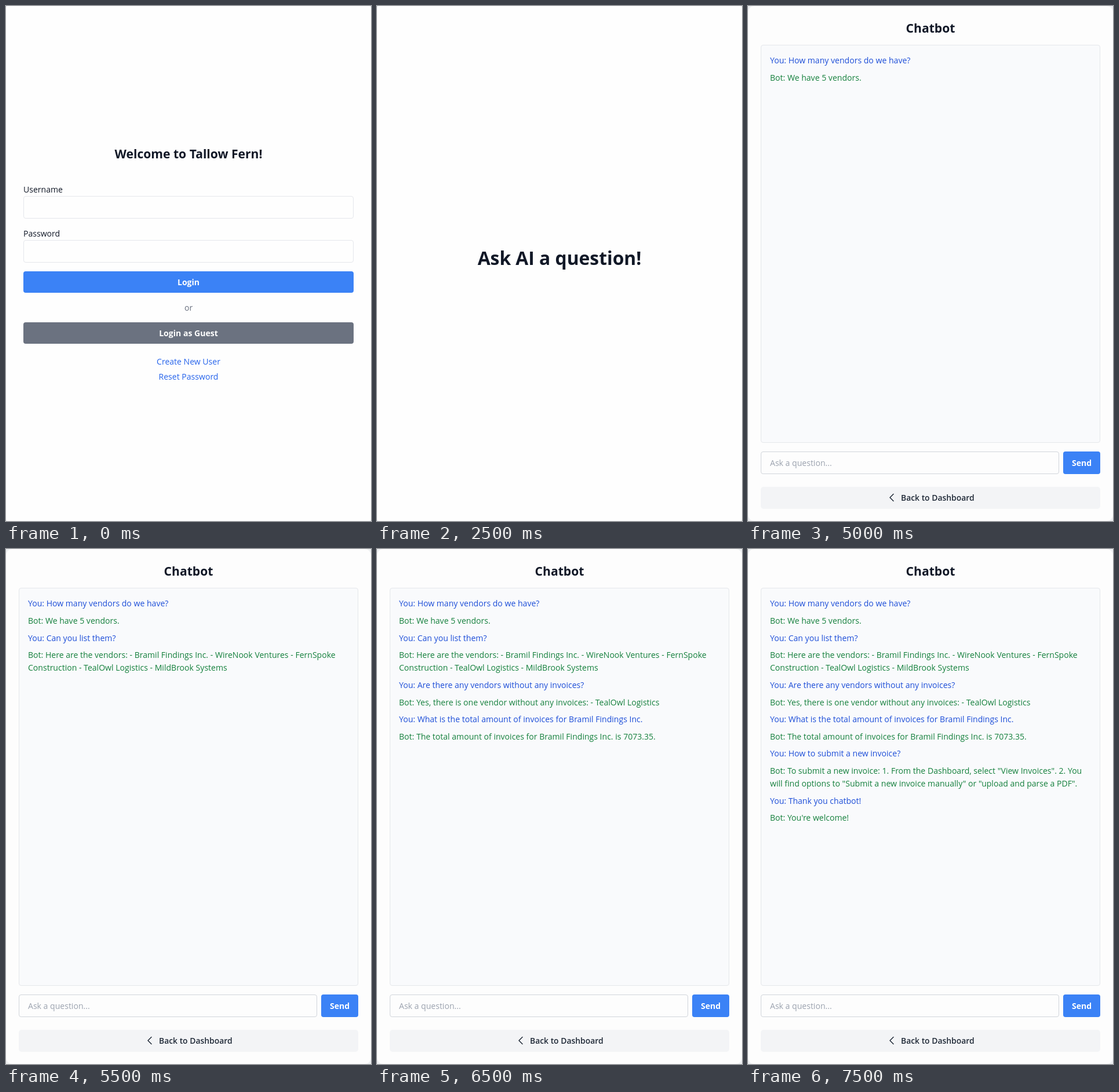
An HTML page that plays this animation: 630 by 889 pixels, repeating every 8000 ms.

```html
<!DOCTYPE html>
<html lang="en">
<head>
<meta charset="utf-8">
<title>Invoice app tour</title>
<style>
  html, body { margin: 0; width: 100%; height: 100%; overflow: hidden; background: #eef0f2; }
  body { font: 14.05px/22.2px "Open Sans", "Noto Sans", sans-serif; color: #111827; }
  .scene { position: absolute; left: 0; top: 0; width: 630px; height: 889px; background: #fefefe; border-radius: 4px; }
  .scene[hidden] { display: none; }
  .scene > * { position: absolute; box-sizing: border-box; white-space: pre; }
  .center { left: 0; width: 630px; text-align: center; }
  .title { font-size: 21.1px; font-weight: 700; line-height: 30px; }
  .field { left: 30px; width: 570px; height: 39px; border: 1px solid #e5e7eb; border-radius: 4px; }
  .button { left: 30px; width: 570px; height: 37px; padding-top: 1px; border-radius: 4px; background: #3b82f6;
    color: #fff; font-weight: 700; line-height: 36px; text-align: center; }
  .gray { background: #6b7280; }
  .link { color: #2563eb; }
  .avatar { left: 541px; top: 37px; width: 52px; height: 52px; border-radius: 50%; background: #d1d5db;
    color: #fff; font-size: 16.5px; font-weight: 700; line-height: 52px; text-align: center; }
  #chat { background: #fdfdfd; border-radius: 11px; }
  .panel { left: 22px; top: 67px; width: 586px; height: 687px; border: 1px solid #e5e7eb; border-radius: 4px; background: #f9fafc; }
  #log { left: 38px; top: 83.4px; }
  #log div { margin-bottom: 7.4px; color: #15803d; }
  #log div:nth-child(odd) { color: #1d4ed8; }
  .prompt { left: 22px; top: 769px; width: 515px; padding-left: 15px; border-color: #d1d5db; color: #9ca3af; line-height: 37px; }
  .send { left: 544px; top: 769px; width: 64px; height: 39px; line-height: 38px; }
  .back { left: 22px; top: 830px; width: 586px; height: 38px; padding-left: 242px; border-radius: 5px;
    background: #f3f4f6; color: #1f2937; font-size: 13.9px; font-weight: 600; line-height: 38px; }
  .chevron { left: 240px; top: 839px; fill: none; stroke: #1f2937; stroke-width: 1.5; stroke-linecap: round; stroke-linejoin: round; }
</style>
</head>
<body>
<div class="scene" id="login">
  <div class="center title" style="top:240px">Welcome to Tallow Fern!</div>
  <div style="left:30px;top:306px">Username</div>
  <div class="field" style="top:328px"></div>
  <div style="left:30px;top:382px">Password</div>
  <div class="field" style="top:404px"></div>
  <div class="button" style="top:457.6px">Login</div>
  <div class="center" style="top:510px;color:#6b7280">or</div>
  <div class="button gray" style="top:546.4px">Login as Guest</div>
  <div class="center link" style="top:602.5px">Create New User</div>
  <div class="center link" style="top:628.5px">Reset Password</div>
</div>

<div class="scene" id="dashboard" hidden>
  <div style="left:37px;top:40px;font-size:17.8px">Welcome</div>
  <div class="title" style="left:37px;top:64px">Ned Fesk</div>
  <div class="avatar">NF</div>
  <div class="button" style="top:122.2px">Invoices</div>
  <div class="button" style="top:174px">Vendors</div>
  <div class="button" style="top:225.9px">Analytics</div>
  <div class="button" style="top:277.7px">Ask AI a Question</div>
  <div class="button gray" style="top:822.3px">Logout</div>
</div>

<div class="scene" id="intro" hidden>
  <div class="center" style="top:415px;font-size:31.8px;font-weight:700;line-height:40px">Ask AI a question!</div>
</div>

<div class="scene" id="chat" hidden>
  <div class="center title" style="top:22.5px">Chatbot</div>
  <div class="panel"></div>
  <div id="log"></div>
  <div class="field prompt">Ask a question...</div>
  <div class="button send">Send</div>
  <div class="back">Back to Dashboard</div>
  <svg class="chevron" width="16" height="20"><path d="M11 3.5 5 9.5l6 6"/></svg>
</div>

<script>
const LOOP = 8000, CHAT_START = 4500, STEP = 500;
const starts = { login: 0, dashboard: 500, intro: 2500, chat: CHAT_START, end: LOOP };
const messages = [
  'How many vendors do we have?',
  'We have 5 vendors.',
  'Can you list them?',
  'Here are the vendors: - Bramil Findings Inc. - WireNook Ventures - FernSpoke\nConstruction - TealOwl Logistics - MildBrook Systems',
  'Are there any vendors without any invoices?',
  'Yes, there is one vendor without any invoices: - TealOwl Logistics',
  'What is the total amount of invoices for Bramil Findings Inc.',
  'The total amount of invoices for Bramil Findings Inc. is 7073.35.',
  'How to submit a new invoice?',
  'To submit a new invoice: 1. From the Dashboard, select "View Invoices". 2. You\nwill find options to "Submit a new invoice manually" or "upload and parse a PDF".',
  'Thank you chatbot!',
  "You're welcome!"
];

const rows = messages.map((text, i) => {
  const row = document.createElement('div');
  row.textContent = (i % 2 ? 'Bot: ' : 'You: ') + text;
  document.getElementById('log').append(row);
  return row;
});
const scenes = [...document.querySelectorAll('.scene')];
const times = Object.values(starts);

function draw() {
  const t = performance.now() % LOOP;
  scenes.forEach((scene, i) => scene.hidden = t < times[i] || t >= times[i + 1]);
  // One question and its answer appear per step.
  const shown = 2 * Math.floor((t - CHAT_START) / STEP);
  rows.forEach((row, i) => row.hidden = i >= shown);
  requestAnimationFrame(draw);
}
draw();
</script>
</body>
</html>
```
